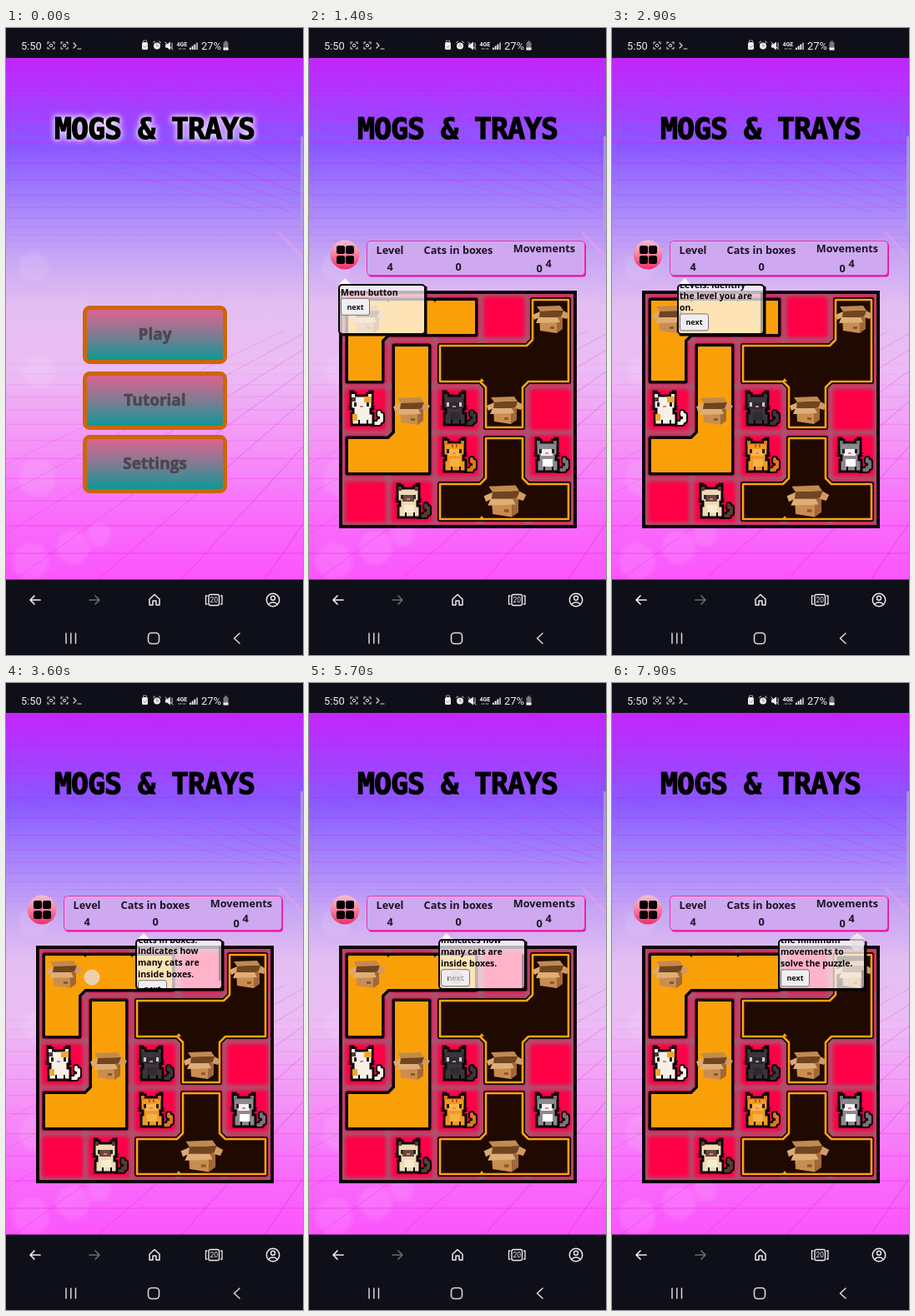
These frames come from a looping animation (356x752 px, 8 s). An HTML page:

```html
<!DOCTYPE html>
<html lang="en">
<head>
<meta charset="utf-8">
<title>Puzzle tutorial</title>
<style>
html, body { margin: 0; width: 100%; height: 100%; overflow: hidden; background: #0f0f19; }
svg { display: block; width: 100%; height: 100%; }
text { font-family: "Open Sans", sans-serif; font-weight: 700; }
.title { font: 700 35px "DejaVu Sans Mono", monospace; letter-spacing: -1.07px; }
.bar text { font-family: Roboto, sans-serif; font-weight: 400; fill: #eee; }
.mid { text-anchor: middle; }
.line { fill: none; stroke-linecap: round; stroke-linejoin: round; }
</style>
</head>
<body>
<svg id="stage" viewBox="0 0 356 752" preserveAspectRatio="none"></svg>
<script>
const LOOP = 8000;
const stage = document.getElementById("stage");

const rect = (x, y, w, h, fill, more = "") =>
  `<rect x="${x}" y="${y}" width="${w}" height="${h}" fill="${fill}" ${more}/>`;
const path = (d, fill, more = "") => `<path d="${d}" fill="${fill}" ${more}/>`;
const line = (d, color, width, more = "") =>
  `<path class="line" d="${d}" stroke="${color}" stroke-width="${width}" ${more}/>`;
const circle = (x, y, r, fill, more = "") =>
  `<circle cx="${x}" cy="${y}" r="${r}" fill="${fill}" ${more}/>`;
const text = (x, y, size, s, more = "") =>
  `<text x="${x}" y="${y}" font-size="${size}" ${more}>${s}</text>`;
const at = (x, y, body, scale = 1) =>
  `<g transform="translate(${x} ${y}) scale(${scale})">${body}</g>`;
const gradient = (id, stops) =>
  `<linearGradient id="${id}" x2="0" y2="1">${stops.map(([o, c]) =>
    `<stop offset="${o}" stop-color="${c}"/>`).join("")}</linearGradient>`;
const range = n => [...Array(n).keys()];

const defs = `<defs>
  ${gradient("sky", [[0, "#c425fb"], [.07, "#ac38ff"], [.17, "#8a58ff"], [.27, "#a280fc"],
    [.38, "#c6a6f4"], [.48, "#e4bff1"], [.6, "#ebbcf4"], [.74, "#f494f7"], [.88, "#f86cfb"], [1, "#fb55fc"]])}
  ${gradient("button", [[0, "#e4608f"], [.5, "#7f7c93"], [1, "#079995"]])}
  ${gradient("menu", [[0, "#efbfd0"], [.4, "#f58fa9"], [1, "#f32b6b"]])}
  <filter id="blur"><feGaussianBlur stdDeviation="3"/></filter>
  <filter id="soft"><feGaussianBlur stdDeviation="2"/></filter>
  <clipPath id="page"><rect y="35.5" width="356" height="626.5"/></clipPath>
  <clipPath id="tipClip"><rect x="1" y="308" width="103" height="58"/></clipPath>
</defs>`;

function background() {
  let s = rect(0, 35.5, 356, 626.5, "url(#sky)");
  const bokeh = [[33, 287, 18], [40, 412, 20], [80, 623, 20], [112, 608, 14], [38, 540, 22], [30, 640, 22]];
  for (const [x, y, r] of bokeh) s += circle(x, y, r, "#fff", `opacity=".1" filter="url(#soft)"`);
  for (const i of range(12)) {
    const fade = .5 * .85 ** i;
    s += line(`M0 ${300 - 225 * .85 ** i}H356`, "#d70ff0", 1, `opacity="${fade}"`);
    s += line(`M0 ${300 + 330 * .9 ** i}H356`, "#ee18e4", 1, `opacity="${fade}"`);
  }
  // Floor and ceiling lines run towards one point right of the stage
  const ray = (x, y, vy, i) =>
    line(`M${x} ${y}L${x + (600 - x) * .7} ${y + (vy - y) * .7}`, "#e214ea", 1, `opacity="${.5 * .85 ** i}"`);
  for (const i of range(7)) s += ray(268 - i * 105, 36, 300, i) + ray(310 - i * 100, 662, 235, i);
  s += line("M328 246L356 275", "#ff9ddc", 3, `opacity=".4"`);
  return s + rect(353, 130, 3, 112, "#b5a8d8", `opacity=".7"`);
}

function title() {
  const word = more => text(58, 133, 35, "MOGS &amp; TRAYS", `class="title" ${more}`);
  return `<g id="glow">${word(`fill="#fff" stroke="#fff" stroke-width="4" filter="url(#blur)"`)}</g>` +
    word(`stroke="#000" stroke-width="1.2"`);
}

const menuScreen = () => [["Play", 333, 70], ["Tutorial", 412, 70], ["Settings", 488, 70]].map(([s, y, h]) =>
  rect(94.5, y + 2.5, 168, h - 5, "url(#button)", `rx="6" stroke="#cc6608" stroke-width="5"`) +
  text(178.5, y + 41, 19, s, `class="mid" fill="#4b4750" stroke="#4b4750" stroke-width=".6"`)).join("");

function infoPanel() {
  const label = (x, y, s) => text(x, y, 12.7, s, `class="mid" fill="#1b1424"`);
  let s = rect(71, 257, 261, 41.5, "#e3179f", `rx="4"`) +
    rect(69.5, 255.5, 261, 41, "#cfa8f0", `rx="4" stroke="#f82fa6"`) +
    label(97, 271, "Level") + label(179, 271, "Cats in boxes") + label(282, 269, "Movements") +
    label(97, 291, "4") + label(179, 291, "0") + label(276, 293, "0") + label(287, 287, "4") +
    circle(43, 272, 17.5, "url(#menu)");
  for (const x of [33, 44]) for (const y of [261, 273]) s += rect(x, y, 10, 10, "#050005", `rx="2.5"`);
  return s;
}

const box = path("M-13-9L-17-15L11-16L15-10Z", "#c08a52") +
  path("M-13-9L15-10L12-2H-15Z", "#71451f") +
  path("M-14-2H7V17L-13 14Z", "#c98d50") + path("M7-2L14-4V12L7 17Z", "#a2683a") +
  path("M-13-9L-22-5L-20 1L-14-2Z", "#dba971") + path("M15-10L22-6L19 0L12-2Z", "#d19a62") +
  path("M-15-2H8L11 4L-18 5Z", "#dfae78") + rect(-1, 9, 5, 3, "#8a5a30");

function cat(x, y, main, { ear = main, face = main, chest = main, eye = "#222", patch = "" }) {
  const dark = "#0b0508";
  const body = "M-17-21h3v2h3v3h14v-3h3v-2h3v21h-2v5h3v14h-26v-14h2v-5h-3z";
  const tail = "M9 17h8v-3h3v-7h-3v-3";
  return at(x, y,
    line(tail, dark, 8) + line(tail, ear, 4) +
    path(body, main, `stroke="${dark}" stroke-width="3"`) +
    rect(-16, -18, 4, 5, ear) + rect(4, -18, 4, 5, ear) + patch +
    rect(-11, -8, 14, 8, face) + rect(-9, 4, 12, 9, chest) +
    rect(-13, -8, 3, 5, eye) + rect(2, -8, 3, 5, eye) + rect(-6, -4, 4, 2, "#d9828b") +
    rect(-8, 13, 2, 6, dark) + rect(2, 13, 2, 6, dark) +
    line("M-20-3h4M-20 0h4M8-3h4M8 0h4", dark, 1.2));
}

function board() {
  let s = rect(36, 315, 285, 285, "#0b0309") + rect(40, 319, 277, 277, "#a8546f");
  for (const r of range(5)) for (const c of range(5))
    s += rect(43 + c * 55.4, 322 + r * 55.4, 49.5, 49.5, "#ff0546", `rx="3" filter="url(#soft)"`);

  const orange = d => line(d + "Z", "#0b0309", 5) + path(d + "Z", "#f9a008") + line(d + "Z", "#0b0309", 2);
  const dark = d => line(d + "Z", "#0b0309", 6) + path(d + "Z", "#1f0901") + line(d + "Z", "#faa40e", 2.6);
  s += orange("M46 326H200V368H95L88 375V424H46");
  s += orange("M102 381H144V534H46V492H95L102 485");
  s += dark("M157 381H261L268 374V326H311V424H263L256 431V479H212V431L205 424H157");
  s += dark("M157 547H205L212 540V492H256V540L263 547H311V589H157");
  for (const x of [95, 151]) s += path(`M${x - 3} 325h6l-3 4z`, "#0b0309");
  for (const y of [424, 589]) s += path(`M204 ${y}h6l-3-4z`, "#faa40e");

  s += at(70, 349, box) + at(123, 459, box) + at(290, 349, box) + at(235, 458, box) + at(235, 567, box, 1.15);
  s += cat(67, 457, "#f7f0e6", { patch: rect(-1, -15, 9, 7, "#f3a52c") + rect(-15, 6, 6, 8, "#f3a52c") + rect(-16, -14, 5, 5, "#4a3c3c") });
  s += cat(178, 457, "#39353a", { eye: "#d8c9c0", face: "#2d292f", chest: "#302b31" });
  s += cat(178, 513, "#f19a22", { ear: "#dc7815", face: "#ffb545", chest: "#f7b246",
    patch: rect(-7, -15, 2, 5, "#b95c0f") + rect(-2, -15, 2, 5, "#b95c0f") });
  s += cat(289, 513, "#8d8990", { ear: "#77727b", face: "#f5f1f1", chest: "#fff" });
  s += cat(123, 568, "#ecdcb5", { ear: "#563b31", face: "#6b4a39", chest: "#f7ecce", eye: "#33262a" });
  return s;
}

// Tooltips: left edge, arrow position, lines of text
const TIPS = [
  { from: 300, x: 35, arrow: 8, lines: ["Menu button"] },
  { from: 1700, x: 78, arrow: 9, lines: ["Levels: identify", "the level you are", "on."] },
  { from: 3500, x: 155, arrow: 10, lines: ["Cats in boxes:", "indicates how", "many cats are", "inside boxes."] },
  { from: 5900, x: 199, arrow: 95, lines: ["Movements:", "it indicates", "the piece", "movements you", "have made, the",
    "potential indicates", "the minimum", "movements to", "solve the puzzle."] }
];

function tip({ x, arrow, lines }) {
  const end = 310 + lines.length * 13.8;
  const thumb = lines.length > 2 ? Math.max(22, 58 * 58 / (end + 24 - 309)) : 0;
  return `<g class="tip" transform="translate(${x} 0)">` +
    path(`M${arrow - 7.5} 307.5l7.5-7.5l7.5 7.5z`, "#fdf3fa") +
    line("M4 368H105V311", "#090509", 3) +
    rect(1, 308, 103, 58, "#fff", `rx="4" opacity=".7"`) +
    `<g clip-path="url(#tipClip)"><g class="scroll">` +
    lines.map((s, i) => text(3, 320.5 + i * 13.8, 10.5, s, `fill="#090509"`)).join("") +
    rect(3.5, end + .5, 34, 20, "#f0eef0", `rx="2.5" stroke="#77707a"`) +
    text(20.5, end + 14, 9, "next", `class="mid" fill="#111"`) +
    `</g>${thumb ? `<rect class="thumb" x="100" y="310" width="3" height="${thumb}" rx="1.5" fill="#77707a" opacity=".6"/>` : ""}</g>` +
    rect(1, 308, 103, 59, "none", `rx="4" stroke="#090509" stroke-width="2"`) + `</g>`;
}

function bars() {
  const frame = x => line(`M${x - 4} 19v-2h2m4 0h2v2m0 4v2h-2m-4 0h-2v-2`, "#ddd", 1.1) +
    circle(x, 21, 1.7, "none", `stroke="#ddd"`);
  const arrow = (x, dir, color) => line(`M${x - 6} 686h12m${dir > 0 ? "-5-5l5 5l-5 5" : "-7-5l-5 5l5 5"}`, color, 1.7);
  let s = rect(0, 0, 356, 35.5, "#0f0f19") + rect(0, 661.5, 356, 91, "#0f0f19");
  s += text(18, 25.5, 12.8, "5:50") + frame(54) + frame(70) +
    line("M81 18l3 3l-3 3M86 25h4", "#ddd", 1.2);
  s += rect(163, 17, 7, 9, "#eee", `rx="1.5"`) + line("M164.5 17v-2h4v2M165 22l1.5 1.5l2.5-3", "#999", 1) +
    circle(181, 21.5, 4, "#eee") + line("M176.5 17.5l2-1.5M185.5 17.5l-2-1.5M181 19v3h2", "#999", 1.2) +
    path("M191 19.5h2l4-3v10l-4-3h-2z", "#eee") + line("M191 17l9 9M199 18v6", "#ddd", 1) +
    text(204.5, 22, 7, "4GE", `style="font-weight:700"`) + line("M207 25h3M212 25h3", "#aaa", 1);
  for (const i of range(4)) s += rect(220 + i * 2.7, 23.5 - i * 2, 1.9, 2.5 + i * 2, i < 3 ? "#eee" : "#aaa");
  s += text(234, 25.5, 13, "27%") + rect(260.5, 17, 6, 9.5, "#777", `rx="1"`) +
    rect(262, 15.5, 3, 2, "#777") + rect(260.5, 23.5, 6, 3, "#eee");

  s += arrow(35, -1, "#eee") + arrow(106, 1, "#696970");
  s += line("M172 685l6-5.5l6 5.5v7h-4v-5h-4v5h-4z", "#eee", 1.5);
  s += rect(243, 679.5, 12.5, 13, "none", `rx="2" stroke="#eee" stroke-width="1.4"`) +
    line("M241 681h-1.5v10h1.5M257.5 681h1.5v10h-1.5", "#eee", 1.3) +
    text(249.2, 689.3, 8.5, "20", `class="mid"`);
  s += circle(320, 686, 7.7, "none", `stroke="#eee" stroke-width="1.5"`) +
    circle(320, 683.8, 2.5, "none", `stroke="#eee" stroke-width="1.4"`) + line("M315 691c2-3 8-3 10 0", "#eee", 1.4);
  s += line("M72 726v12M77.8 726v12M83.5 726v12", "#d8d8dc", 1.5);
  s += rect(170.5, 725.5, 13, 13, "none", `rx="4" stroke="#d8d8dc" stroke-width="1.6"`);
  s += line("M280 726l-6.5 6l6.5 6", "#d8d8dc", 1.6);
  return `<g class="bar">${s}</g>`;
}

stage.innerHTML = defs + `<g clip-path="url(#page)">${background()}${title()}
  <g id="menuScreen">${menuScreen()}</g>
  <g id="game">${infoPanel()}${board()}${TIPS.map(tip).join("")}</g></g>${bars()}
  <circle id="touch" r="9" fill="#e6e1e4" fill-opacity=".75" stroke="#fff" stroke-opacity=".45"/>`;

const find = id => document.getElementById(id);
const [menu, game, glow, touch] = ["menuScreen", "game", "glow", "touch"].map(find);
const tips = [...document.querySelectorAll(".tip")];

// Time and scroll offset
const SCROLL = [[0, 0], [2300, 0], [2800, 9], [4300, 9], [4750, 0], [4900, 0], [5300, 22],
  [6300, 22], [6700, 36.6], [6800, 40], [7200, 40], [7700, 90.8], [LOOP, 90.8]];
// Start, end, first point, last point
const TOUCHES = [
  [100, 300, 178, 370, 178, 370], [1500, 1690, 55, 335, 55, 335],
  [2300, 2800, 140, 352, 140, 340], [3400, 3690, 103, 353, 103, 353],
  [4300, 4850, 229, 345, 229, 371], [4850, 5300, 229, 371, 229, 335],
  [5700, 5950, 176, 353, 176, 353], [6300, 6800, 280, 353, 280, 338],
  [7200, 7700, 294, 358, 294, 311], [7700, LOOP, 294, 311, 294, 311]
];

const mix = (a, b, k) => a + (b - a) * Math.min(1, Math.max(0, k));
function sample(table, t) {
  const i = Math.max(1, table.findIndex(([time]) => time >= t));
  const [t0, a] = table[i - 1], [t1, b] = table[i];
  return mix(a, b, (t - t0) / (t1 - t0));
}
const show = (el, on) => { el.style.display = on ? "" : "none"; };

function draw(t) {
  const playing = t >= TIPS[0].from;
  show(menu, !playing);
  show(game, playing);

  const pulse = t % 2000;
  glow.setAttribute("opacity", pulse > 1920 ? (pulse - 1920) / 80 : mix(.85, 0, pulse / 600));

  const offset = sample(SCROLL, t);
  tips.forEach((el, i) => {
    const on = t >= TIPS[i].from && t < (TIPS[i + 1]?.from ?? LOOP);
    show(el, on);
    if (!on) return;
    el.querySelector(".scroll").setAttribute("transform", `translate(0 ${-offset})`);
    const thumb = el.querySelector(".thumb");
    if (thumb) thumb.setAttribute("y", 309 + offset * 58 / (TIPS[i].lines.length * 13.8 + 25));
  });

  const press = TOUCHES.find(([a, b]) => t >= a && t < b);
  show(touch, press);
  if (press) {
    const [a, b, x0, y0, x1, y1] = press;
    const k = (t - a) / (b - a);
    touch.setAttribute("cx", mix(x0, x1, k));
    touch.setAttribute("cy", mix(y0, y1, k));
  }
}

const start = performance.now();
function tick() {
  draw((performance.now() - start) % LOOP);
  requestAnimationFrame(tick);
}
tick();
</script>
</body>
</html>
```
